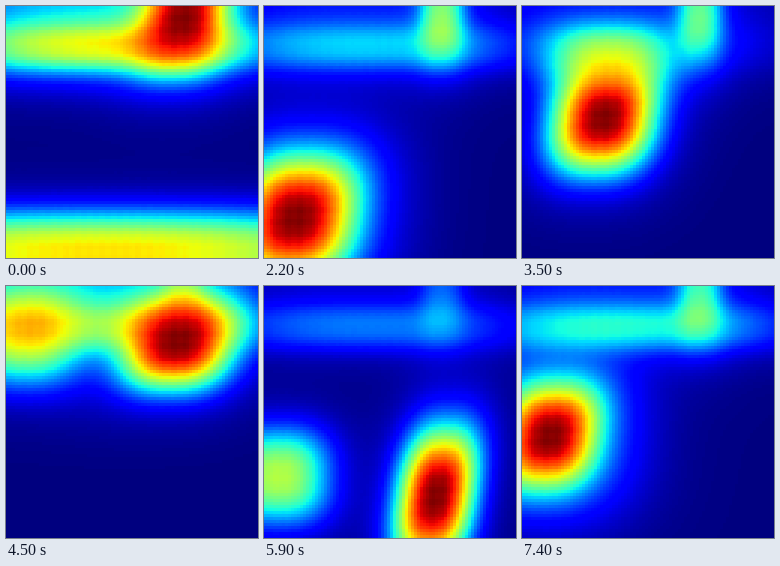
A matplotlib script for the animation above (7.5 s loop, 252 by 252 pixels).

```python
import numpy as np
import matplotlib.pyplot as plt
from matplotlib.animation import FuncAnimation

SIZE, CELLS, FRAMES, STEP = 252, 84, 75, 100
LEAN = -.15  # the hot spot tilts towards the lower left

# Key poses, one per entry of TIMES (in steps).
TIMES = [0, 13, 22, 35, 45, 59, 74]
# hot spot: x, y, width, height
HOT = [(178, 10, 42, 50), (5, 166, 55, 38), (32, 212, 58, 60),
       (82, 112, 51, 54), (172, 57, 53, 45), (172, 210, 38, 68),
       (28, 150, 46, 50)]
# companion glow: x, y, width, height, strength
SIDE = [(100, 246, 300, 40, .65), (95, 155, 53, 52, .82),
        (45, 200, 90, 85, .12), (85, 48, 60, 30, .36),
        (18, 48, 54, 50, .52), (15, 190, 50, 47, .54),
        (30, 150, 88, 82, .20)]
# strength of the fixed parts at the top: sky, strip, column
TOP = [(.33, .46, 0), (.13, .20, .50), (.14, .22, .42), (.12, .05, .38),
       (.28, .26, .25), (.07, .18, .16), (.14, .27, .33)]

axis = (np.arange(CELLS) + .5) * SIZE / CELLS
X, Y = np.meshgrid(axis, axis)
weave = 1 + .005 * (np.cos(X * np.pi / 6) + np.cos(Y * np.pi / 6))


def bump(x, y, w, h, lean=0):
    dx = X - x - lean * (Y - y)
    return np.exp(-np.abs(dx / w) ** 2.5 - np.abs((Y - y) / h) ** 2.5)


def glow(x, y, w, h, amp, lean=0):
    """A rounded spot with a faint, wider halo."""
    return amp * (.9 * bump(x, y, w, h, lean) + .1 * bump(x, y, 1.7 * w, 1.7 * h, lean))


def pose(keys, n):
    """Ease between the key poses around step n."""
    i = min(np.searchsorted(TIMES, n, side="right") - 1, len(TIMES) - 2)
    t = (n - TIMES[i]) / (TIMES[i + 1] - TIMES[i])
    t = t * t * (3 - 2 * t)
    return (1 - t) * np.array(keys[i]) + t * np.array(keys[i + 1])


def heat(n):
    sky, strip, column = pose(TOP, n)
    parts = [
        glow(*pose(HOT, n), .95, LEAN),
        glow(*pose(SIDE, n)),
        glow(90, 18, 160, 54, sky),
        glow(105, 41, 150, 23, strip),
        glow(178, 5, 22, 48, column),
    ]
    field = (1 - np.prod([1 - p for p in parts], axis=0)) * weave
    return field / field.max()


fig = plt.figure(figsize=(SIZE / 100, SIZE / 100), dpi=100)
ax = fig.add_axes([0, 0, 1, 1])
ax.axis("off")
image = ax.imshow(heat(0), cmap="jet", vmin=0, vmax=1,
                  interpolation="nearest", aspect="auto")


def draw(n):
    image.set_data(heat(n))
    return [image]


anim = FuncAnimation(fig, draw, frames=FRAMES, interval=STEP,
                     repeat=True, repeat_delay=0, blit=False)
plt.show()
```
